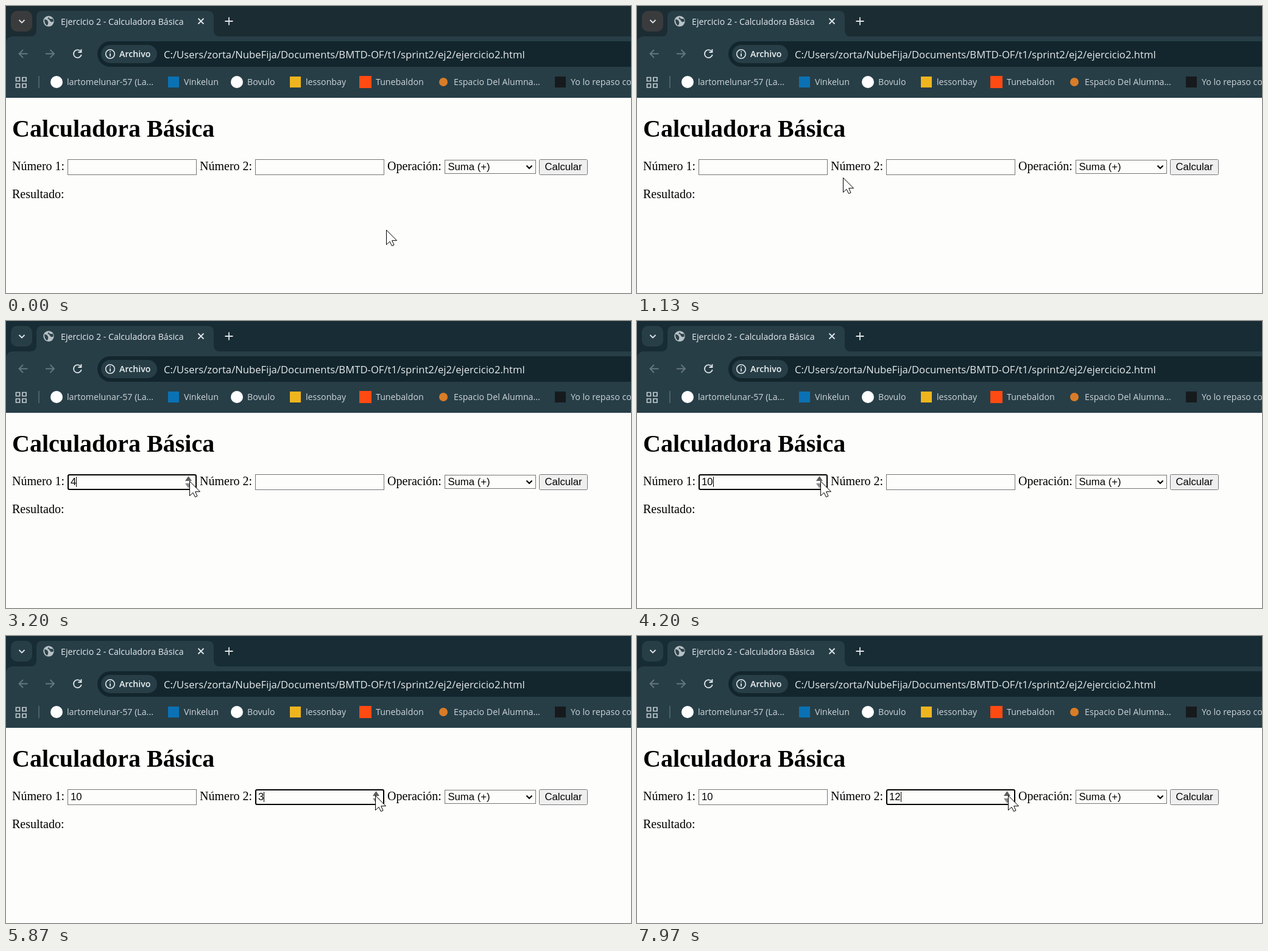
These frames come from a looping animation (1026 by 472 pixels, 8 s). An HTML page:

```html
<!DOCTYPE html>
<html lang="es">
<head>
<meta charset="utf-8">
<title>Calculadora Básica</title>
<style>
  html, body { margin: 0; width: 100%; height: 100%; overflow: hidden; background: #fdfdfc; }
  svg { display: block; width: 100%; height: 100%; }
  text { white-space: pre; }
  .ui { font: 14.2px "Open Sans", "Noto Sans", sans-serif; fill: #ced6da; }
  .serif { font: 20px "Liberation Serif", "Times New Roman", serif; }
  .form { font: 16.67px "Liberation Sans", Arial, sans-serif; }
  .bar { fill: #273e47; }
  .icon { fill: none; stroke: #dfe5e8; stroke-width: 1.8; }
  .dim { stroke: #66787f; }
  .box { fill: #fdfdfc; stroke: #767676; }
</style>
</head>
<body>
<svg viewBox="0 0 1026 472">
  <rect width="1026" height="472" fill="#fdfdfc"/>

  <!-- Tab strip -->
  <rect id="strip" width="1026" height="70"/>
  <rect id="menu" x="8" y="8" width="35" height="34" rx="10"/>
  <path class="icon" d="M21.5 23l4.5 4.5 4.5-4.5"/>
  <path class="bar" d="M0 151V62Q0 50 12 50H40Q50 50 50 40V18Q50 8 60 8H331Q341 8 341 18V40Q341 50 351 50H1026V151Z"/>
  <circle cx="70" cy="25" r="8.7" fill="#b8c1c5"/>
  <path d="M63 22q5 0 6 4t-2 6q-4-3-4-10zM70 18q1 4 7 3l1 4q-4 3-6-1t-4-2z" fill="#2d434b"/>
  <text class="ui" x="90" y="31" style="fill:#e6ebee">Ejercicio 2 - Calculadora Básica</text>
  <path class="icon" d="M315.5 20.5l9 9m0-9l-9 9M359.5 25h13m-6.5-6.5v13"/>

  <!-- Address bar -->
  <path class="icon dim" d="M35.5 78.5H21.5m6.5-6.5l-6.5 6.5 6.5 6.5M65 78.5h14m-6.5-6.5l6.5 6.5-6.5 6.5"/>
  <path class="icon" d="M122.5 74.5a6.5 6.5 0 1 0 1.3 5.5M123.5 71v5h-5"/>
  <rect x="150" y="58" width="900" height="42" rx="21" fill="#13262d"/>
  <rect class="bar" x="156" y="64" width="92" height="30" rx="15"/>
  <circle class="icon" cx="171" cy="79" r="7.3" style="stroke-width:1.6"/>
  <path class="icon" d="M171 78v5m0-8.5v1.8"/>
  <text class="ui" x="186" y="84" style="font-weight:600;fill:#edf1f3">Archivo</text>
  <text class="ui" x="259" y="85.5" style="font-size:16.67px;fill:#e6ebed">C:/Users/zorta/NubeFija/Documents/BMTD-OF/t1/sprint2/ej2/ejercicio2.html</text>

  <!-- Bookmarks -->
  <path class="icon" d="M16.5 117.5h6v6h-6zM27 117.5h6v6h-6zM16.5 128h6v6h-6zM27 128h6v6h-6z" style="stroke:#c3cccf;stroke-width:1.7"/>
  <path d="M54 115v20" stroke="#4b626b" stroke-width="2"/>
  <circle cx="83" cy="125" r="10" fill="#fff"/>
  <rect x="266" y="116" width="18" height="18" fill="#0a72b4"/>
  <circle cx="379" cy="125" r="10" fill="#fff"/>
  <rect x="466" y="116" width="18" height="18" fill="#efb51e"/>
  <rect x="580" y="115" width="20" height="20" fill="#ff4a12"/>
  <circle cx="718" cy="125" r="7" fill="#d97c28"/>
  <rect x="901" y="116" width="18" height="18" fill="#161a1c"/>
  <g class="ui">
    <text x="100" y="130">lartomelunar-57 (La...</text>
    <text x="292" y="130">Vinkelun</text>
    <text x="396" y="130">Bovulo</text>
    <text x="492" y="130">lessonbay</text>
    <text x="607" y="130">Tunebaldon</text>
    <text x="735" y="130">Espacio Del Alumna...</text>
    <text x="927" y="130">Yo lo repaso conmigo</text>
  </g>

  <!-- Page -->
  <g class="serif">
    <text x="10" y="215" style="font-size:40px;font-weight:bold">Calculadora Básica</text>
    <text x="10" y="270">Número 1:</text>
    <text x="318" y="270">Número 2:</text>
    <text x="626" y="270">Operación:</text>
    <text x="10" y="316">Resultado:</text>
  </g>
  <g id="fields"></g>
  <rect class="box" x="720.5" y="253.5" width="149" height="22"/>
  <path d="M854.5 262.5l4.5 4.5 4.5-4.5" fill="none" stroke="#000" stroke-width="2.2"/>
  <rect class="box" x="875.5" y="252.5" width="79" height="25" rx="2" style="fill:#efefef"/>
  <g class="form">
    <text x="725.5" y="270">Suma (+)</text>
    <text x="884.5" y="270">Calcular</text>
  </g>

  <path id="arrow" d="M.5.5V24.5L6 19.3 9.5 26.5 13 25 9.7 17.7H17.5Z" fill="#fff" stroke="#000"/>
  <path id="beam" d="M-6-12h4.5L0-11l1.5-1H7M0-11V12M-6 13h4.5L0 12l1.5 1H7" fill="none" stroke="#000" stroke-width="2"/>
</svg>
<script>
const $ = id => document.getElementById(id);
const LOOP = 8000, PALETTE_SHIFT = 2530, BLINK = 530;

// Pointer path: time, x, y
const path = [
  [0, 624, 368], [500, 520, 441], [870, 400, 369], [1130, 338, 282],
  [1700, 325, 280], [2150, 295, 263], [2500, 295, 263], [2580, 299, 292],
  [2670, 301, 263], [4220, 301, 263], [5000, 596, 263], [5300, 606, 262],
  [7250, 606, 262], [7500, 609, 262], [LOOP, 609, 262]
];

// The "up" button of each field is pressed at a steady pace
const fields = [
  { x: 101, from: 2670, to: 5365, step: 170, max: 10 },
  { x: 409, from: 5365, to: Infinity, step: 190, max: 12 }
];

for (const f of fields) {
  const g = document.createElementNS("http://www.w3.org/2000/svg", "g");
  g.setAttribute("transform", `translate(${f.x} 252)`);
  g.innerHTML = `<rect class="box" x=".5" y=".5" width="211" height="25"/>
    <text class="form" x="5" y="18"></text>
    <rect y="4" width="1" height="17"/>
    <g fill="#8a8a8a"><path d="M193 11l5.5-8 5.5 8z"/><path d="M193 15h11l-5.5 8z"/></g>`;
  $("fields").append(g);
  [f.box, f.text, f.caret, f.spin] = g.children;
}

// Monotone cubic through the path, so turns are smooth and rests stay still
const slope = (i, c) => (path[i + 1][c] - path[i][c]) / (path[i + 1][0] - path[i][0]);

function tangent(i, c) {
  if (i === 0 || i === path.length - 1) return 0;
  const a = slope(i - 1, c), b = slope(i, c);
  return a * b > 0 ? 2 * a * b / (a + b) : 0;
}

function pointer(t) {
  const j = path.findIndex(p => p[0] > t), i = j - 1;
  const span = path[j][0] - path[i][0], k = (t - path[i][0]) / span;
  return [1, 2].map(c =>
    path[i][c] + (path[j][c] - path[i][c]) * k * k * (3 - 2 * k) +
    span * k * (1 - k) * (tangent(i, c) * (1 - k) - tangent(j, c) * k));
}

const show = (el, on) => el.setAttribute("visibility", on ? "visible" : "hidden");

function drawField(f, t, x, y) {
  const focus = t >= f.from && t < f.to;
  const hover = x >= f.x && x < f.x + 212 && y >= 252 && y < 278;
  const count = Math.max(0, Math.min(f.max, Math.floor((t - f.from) / f.step) + 1));
  const value = count ? String(count) : "";
  const idle = t - f.from - (count - 1) * f.step;
  const inset = focus ? 1 : 0.5;
  const attrs = { x: inset, y: inset, width: 212 - 2 * inset, height: 26 - 2 * inset, rx: focus ? 2 : 0 };
  for (const k in attrs) f.box.setAttribute(k, attrs[k]);
  f.box.style.stroke = focus ? "#000" : hover ? "#484848" : "#767676";
  f.box.style.strokeWidth = focus ? 2 : 1;
  f.text.textContent = value;
  f.caret.setAttribute("x", Math.round(5 + 9.27 * value.length));
  show(f.caret, focus && Math.floor(idle / BLINK) % 2 === 0);
  show(f.spin, focus || hover);
  f.spin.firstChild.setAttribute("fill", hover && x > f.x + 190 ? "#5e5e5e" : "#8a8a8a");
}

function draw(t) {
  const early = t < PALETTE_SHIFT;
  $("strip").setAttribute("fill", early ? "#1c2c33" : "#172c34");
  $("menu").setAttribute("fill", early ? "#3a3b3d" : "#273e47");

  const [x, y] = pointer(t);
  for (const f of fields) drawField(f, t, x, y);

  const overText = y > 252 && y < 278 &&
    [[101, 291], [318, 404], [409, 599]].some(([a, b]) => x > a && x < b);
  for (const id of ["arrow", "beam"]) {
    $(id).setAttribute("transform", `translate(${Math.round(x)} ${Math.round(y)})`);
    show($(id), overText === (id === "beam"));
  }
}

const start = performance.now();
function tick() {
  draw((performance.now() - start) % LOOP);
  requestAnimationFrame(tick);
}
tick();
</script>
</body>
</html>
```
